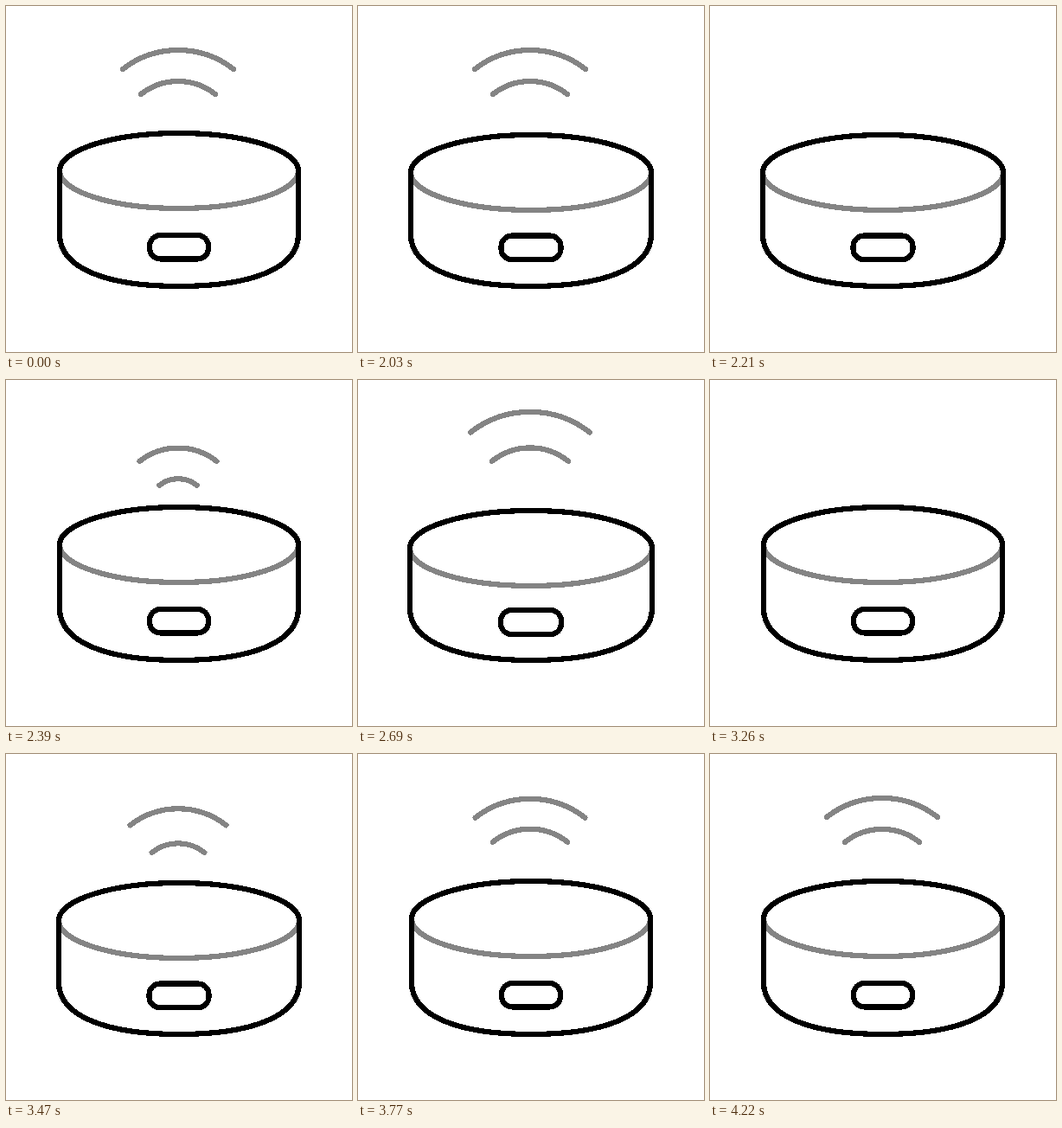
An HTML page for the animation above (4.25 s loop, 400 by 400 pixels).

```html
<!DOCTYPE html>
<html lang="en">
<head>
<meta charset="utf-8">
<title>Smart speaker</title>
<style>
  html, body { margin: 0; width: 100%; height: 100%; overflow: hidden; background: #fff; }
  svg { display: block; width: 100%; height: 100%; }
  path, rect { fill: none; stroke: #000; stroke-width: 6.2; stroke-linecap: round; stroke-linejoin: round; shape-rendering: crispEdges; }
  .soft { stroke: #848484; }
</style>
</head>
<body>
<svg viewBox="0 0 400 400">
  <path id="outer" class="soft"/>
  <path id="inner" class="soft"/>
  <path id="rim" class="soft"/>
  <path id="shell"/>
  <rect id="button" rx="12.5"/>
</svg>
<script>
const LOOP = 4250, START = 2030, STEP = 30;
const BEATS = [2000, 2630, 3260];   // body is pressed
const GROWTHS = [2309, 2910, 3365]; // waves leave the speaker again
const LEAD = 260;                   // waves fly off this long before a growth
const el = id => document.getElementById(id);

const spring = q => q < 0 ? 0 : 1 - Math.exp(-.0075 * q) * Math.cos(.0121 * q);

function pulse(t) {
  if (t <= 0 || t >= 255) return 0;
  return t < 120 ? t / 120 : (1 + Math.cos(Math.PI * (t - 120) / 135)) / 2;
}

// An arc that springs out of the speaker, then flies off the top
function drawWave(id, t, { half, sag, rise, delay, swell }) {
  const last = GROWTHS.filter(g => g <= t).pop();
  const next = GROWTHS.find(g => g > t);
  const u = next ? Math.max(0, (t - next + LEAD) / 170) : 0;
  const s = (last ? spring(t - last - delay) : 1) * (1 + swell * u);
  const y = 142 - 130 * u * u - (rise - sag) * s;
  const w = half * s, r = (half * half + sag * sag) / (2 * sag) * s;
  el(id).style.display = s < .04 ? 'none' : '';
  el(id).setAttribute('d', `M${199 - w} ${y}A${r} ${r} 0 0 1 ${199 + w} ${y}`);
}

// The lid sinks and the sides bulge with press p
function drawBody(p) {
  const w = 138 + 4 * p, l = 200 - w, r = 200 + w, y = 190.5 + 8 * p;
  el('rim').setAttribute('d', `M${l} ${y}A${w} 43.5 0 0 0 ${r} ${y}`);
  el('shell').setAttribute('d', `M${l} ${y}A${w} 43.5 0 0 1 ${r} ${y}V264
    C${r} 304 282 324 200 324S${l} 304 ${l} 264Z`);
  const b = 34 + 2 * p;
  const box = { x: 200 - b, y: 265 + 2 * p, width: 2 * b, height: 27.5 + p };
  for (const k in box) el('button').setAttribute(k, box[k]);
}

function draw(ms) {
  let t = ms % LOOP;
  t = t < START ? 0 : START + Math.floor((t - START) / STEP) * STEP;
  drawWave('outer', t, { half: 64, sag: 22, rise: 91, delay: 0, swell: .3 });
  drawWave('inner', t, { half: 43, sag: 15, rise: 55, delay: 23, swell: 0 });
  drawBody(Math.max(...BEATS.map(b => pulse(t - b))));
}

const t0 = performance.now();
function tick() {
  draw(performance.now() - t0);
  requestAnimationFrame(tick);
}
tick();
</script>
</body>
</html>
```
